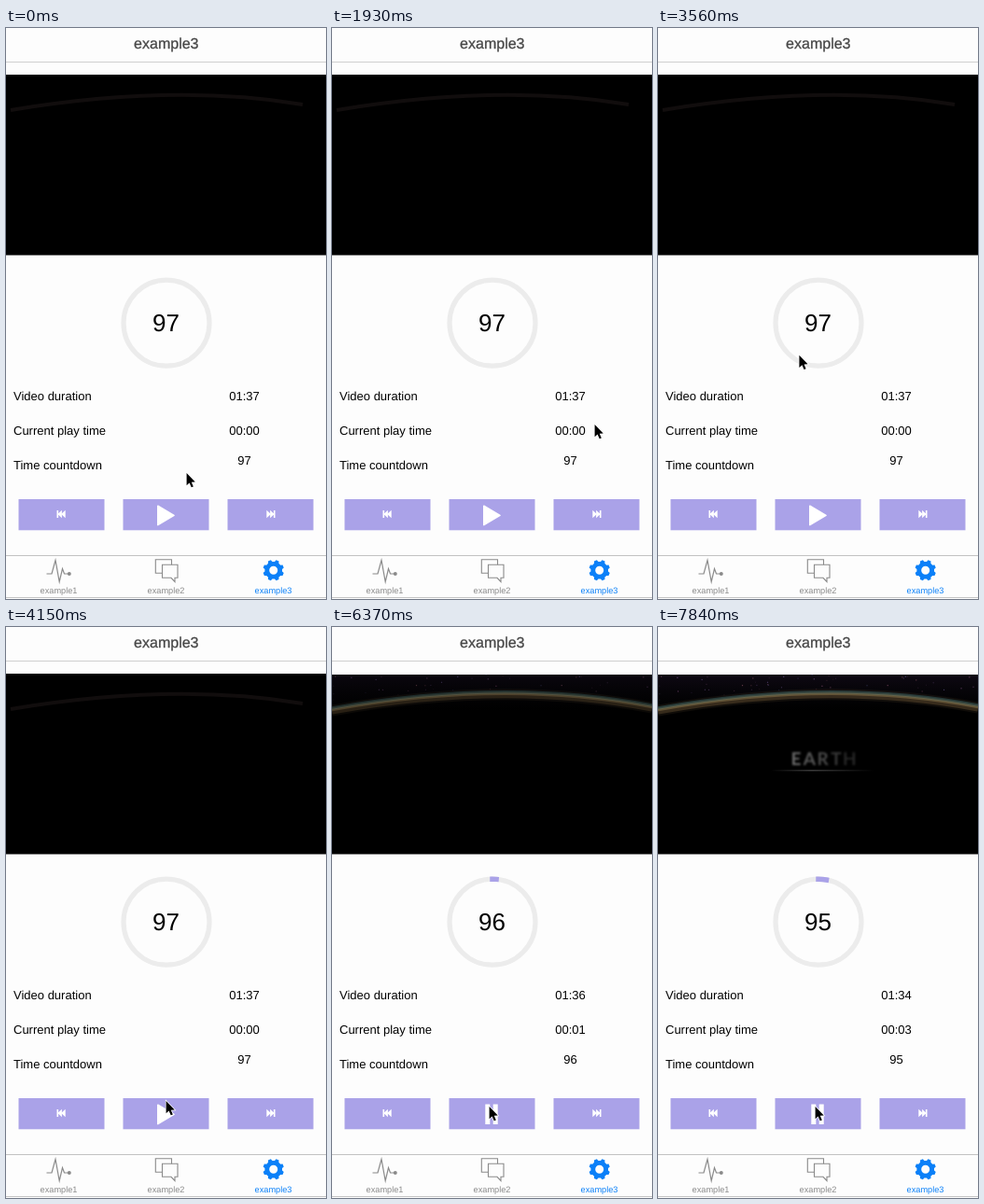
These frames come from a looping animation (343 by 612 pixels, 7990 ms). An HTML page with a canvas:

```html
<!DOCTYPE html>
<html lang="en">
<head>
<meta charset="utf-8">
<title>Video player</title>
<style>
  html, body { margin: 0; width: 100%; height: 100%; overflow: hidden; background: #fdfdfd; }
  canvas { display: block; width: 343px; height: 612px; }
</style>
</head>
<body>
<canvas id="stage"></canvas>
<script>
const W = 343, H = 612, LOOP = 7990;
const START = 1340, STEP = 147.8, LAST_STEP = 44, PLAY_STEP = 23;
const DURATION = 97, TAU = Math.PI * 2;
const LILAC = '#aaa2e8', GRAY = '#8a8a8a', BLUE = '#0b80f8', PAPER = '#fdfdfd';
const FONT = '"Liberation Sans", Arial, sans-serif';

const canvas = document.getElementById('stage');
const ctx = canvas.getContext('2d');
const dpr = window.devicePixelRatio || 1;
canvas.width = W * dpr;
canvas.height = H * dpr;
ctx.textRendering = 'geometricPrecision';

// Stops of the pointer tip: [step, x, y]
const stops = [
  [-1, 193, 476], [4, 281, 424], [8, 201, 434], [11, 146, 301],
  [16, 152, 362], [19, 171, 507], [21, 168, 513]
];

const clamp = (v, lo = 0, hi = 1) => Math.min(hi, Math.max(lo, v));
const mix = (a, b, f) => a + (b - a) * f;

function pointerAt(step) {
  const i = stops.findIndex(s => step < s[0]);
  if (i < 0) return stops[stops.length - 1].slice(1);
  const [k0, x0, y0] = stops[i - 1], [k1, x1, y1] = stops[i];
  const f = (step - k0) / (k1 - k0);
  return [mix(x0, x1, f), mix(y0, y1, f)];
}

function randomizer(seed) {
  return () => (seed = (seed * 16807) % 2147483647) / 2147483647;
}

function rect(x, y, w, h, color) {
  ctx.fillStyle = color;
  ctx.fillRect(x, y, w, h);
}

function text(str, x, y, size, color = '#000', align = 'center') {
  ctx.font = `${size}px ${FONT}`;
  ctx.textAlign = align;
  ctx.fillStyle = color;
  ctx.fillText(str, x, y);
}

function stroke(color, width) {
  ctx.strokeStyle = color;
  ctx.lineWidth = width;
  ctx.stroke();
}

function fill(color, rule = 'nonzero') {
  ctx.fillStyle = color;
  ctx.fill(rule);
}

function trace(points, closed = true) {
  ctx.beginPath();
  points.forEach(([x, y]) => ctx.lineTo(x, y));
  if (closed) ctx.closePath();
}

function arc(cx, cy, r, from = 0, to = TAU) {
  ctx.beginPath();
  ctx.arc(cx, cy, r, from, to);
}

function horizon(dy, width, color) {
  ctx.beginPath();
  ctx.moveTo(0, 88.5 + dy);
  ctx.quadraticCurveTo(184, 55.5 + dy, W, 85.5 + dy);
  stroke(color, width);
}

function drawStars(level) {
  const rand = randomizer(421);
  for (let i = 0; i < level * 60; i++) {
    const x = rand() * W;
    const edge = 71 + 16 * ((x - 188) / 188) ** 2;
    const y = 51 + rand() * (edge - 56);
    rect(x, y, 1.2, 1.2, `hsla(${230 + rand() * 130},40%,62%,${mix(0.1, 0.55, rand()) * level})`);
  }
}

function drawTitle(show) {
  ctx.save();
  ctx.font = '700 19px Lato, sans-serif';
  ctx.textAlign = 'center';
  ctx.filter = `blur(${0.8 * dpr}px)`;
  [...'EARTH'].forEach((letter, i) => {
    ctx.fillStyle = `rgba(150,150,150,${show * (0.7 - i * 0.11)})`;
    ctx.fillText(letter, 148 + i * 14.3, 147.5);
  });
  ctx.restore();
  const line = ctx.createLinearGradient(121, 0, 231, 0);
  line.addColorStop(0, 'rgba(130,130,130,0)');
  line.addColorStop(0.4, `rgba(130,130,130,${show * 0.45})`);
  line.addColorStop(1, 'rgba(130,130,130,0)');
  rect(121, 153, 110, 1.5, line);
}

function drawVideo(playing, t) {
  const top = playing ? 51 : 50;
  ctx.save();
  ctx.beginPath();
  ctx.rect(0, top, W, 243.5 - top);
  ctx.clip();
  rect(0, top, W, 194, '#000');
  if (playing) {
    const level = 0.42 + 0.16 * t;
    const sky = ctx.createLinearGradient(0, top, 0, 90);
    sky.addColorStop(0, `rgba(16,10,22,${level})`);
    sky.addColorStop(1, 'rgba(8,8,12,0)');
    rect(0, top, W, 40, sky);
    drawStars(level);
    horizon(1, 12, `rgba(70,55,38,${level * 0.25})`);
    horizon(1.5, 7, `rgba(105,82,50,${level * 0.5})`);
    horizon(-1.5, 3.5, `rgba(60,105,105,${level * 0.55})`);
    horizon(0.5, 2.5, `rgba(150,130,85,${level * 0.5})`);
    drawTitle(clamp((t - 1.9) / 0.94));
  } else {
    ctx.beginPath();
    ctx.moveTo(5, 88);
    ctx.quadraticCurveTo(180, 59, 318, 82);
    stroke('#110d0d', 4);
  }
  ctx.restore();
}

function drawRing(t, playing, left) {
  const from = -TAU / 4;
  arc(172, 316.2, 46);
  stroke('#ececec', 5.2);
  if (playing) {
    ctx.lineCap = 'square';
    arc(172, 316.2, 46, from, from + Math.max(t, 0.1) / DURATION * TAU);
    stroke(LILAC, 5.5);
    ctx.lineCap = 'butt';
  }
  text(left, 171.5, 325, 26);
}

// Two arrowheads and a bar; dir is -1 for previous, 1 for next
function drawSkip(cx, dir) {
  const cy = 521;
  for (const x of [-4.2, -0.4]) {
    trace([[cx + dir * x, cy - 4.3], [cx + dir * (x + 4.6), cy], [cx + dir * x, cy + 4.3]]);
    fill('#fff');
  }
  rect(cx + dir * 4.2 - 0.8, cy - 4, 1.6, 8, '#fff');
}

function drawButtons(playing) {
  for (let i = 0; i < 3; i++) rect(13.5 + i * 112, 505, 92, 33.3, LILAC);
  drawSkip(59.5, -1);
  drawSkip(283.5, 1);
  if (playing) {
    for (const x of [164.3, 172.7]) rect(x, 511.5, 5, 21.5, '#fff');
  } else {
    ctx.lineJoin = 'round';
    trace([[162.8, 512.2], [180, 522.4], [162.8, 532.6]]);
    fill('#fff');
    stroke('#fff', 1.6);
    ctx.lineJoin = 'miter';
  }
}

function drawPulse() {
  trace([[43.5, 585], [49, 585], [53, 570.5], [57.2, 593.5], [60.5, 579.5], [62.5, 585], [67, 585]], false);
  stroke(GRAY, 1.2);
  arc(67.8, 585, 2);
  fill(GRAY);
}

function drawChat() {
  ctx.beginPath();
  ctx.rect(160.3, 569.7, 17.2, 14.5);
  stroke(GRAY, 1.1);
  trace([[167.5, 575.3], [184, 575.3], [184, 589.3], [181, 589.3], [181, 593.5], [177, 589.3], [167.5, 589.3]]);
  fill(PAPER);
  stroke(GRAY, 1.1);
}

function drawGear(cx, cy) {
  const points = [];
  for (let i = 0; i < 8; i++) {
    for (const [turn, r] of [[-0.25, 11.4], [-0.14, 9.4], [0.14, 9.4], [0.25, 11.4]]) {
      const a = i * TAU / 8 + turn;
      points.push([cx + r * Math.cos(a), cy + r * Math.sin(a)]);
    }
  }
  trace(points);
  ctx.moveTo(cx + 4.5, cy);
  ctx.arc(cx, cy, 4.5, 0, TAU);
  fill(BLUE, 'evenodd');
}

function drawTabs() {
  rect(0, 565, W, 1, '#c2c2c2');
  rect(0, 610, W, 1, '#c4c4c4');
  drawPulse();
  drawChat();
  drawGear(286.7, 581.3);
  for (let i = 0; i < 3; i++) {
    text(`example${i + 1}`, 56.5 + i * 115, 606, 9.2, i === 2 ? BLUE : GRAY);
  }
}

function drawPointer(x, y) {
  ctx.save();
  ctx.translate(x + 0.6, y + 1);
  ctx.scale(0.88, 0.88);
  trace([[0, 0], [0, 15], [3.4, 11.8], [5.8, 17.4], [8.2, 16.4], [5.9, 11], [10.4, 10.8]]);
  stroke('#fff', 1.6);
  fill('#000');
  ctx.restore();
}

const clock = s => [Math.floor(s / 60), s % 60].map(n => String(n).padStart(2, '0')).join(':');

function draw(ms) {
  const step = clamp(Math.floor((ms - START + 12) / STEP), -1, LAST_STEP);
  const playing = step >= PLAY_STEP;
  const t = playing ? Math.max(0, (START + step * STEP - 5000) / 1000) : 0;
  const played = Math.round(t);
  const left = String(Math.ceil(DURATION - t));

  ctx.setTransform(dpr, 0, 0, dpr, 0, 0);
  rect(0, 0, W, H, PAPER);
  rect(0, 36, W, 1, '#cfcfcf');
  text('example3', 171.8, 22, 16, '#474747');
  ctx.strokeStyle = '#474747';
  ctx.lineWidth = 0.3;
  ctx.strokeText('example3', 171.8, 22);

  drawVideo(playing, t);
  drawRing(t, playing, left);

  ['Video duration', 'Current play time', 'Time countdown'].forEach((label, i) => {
    text(label, 8, 399 + i * 37, 13, '#000', 'left');
  });
  text(clock(DURATION - played), 255.5, 399, 13);
  text(clock(played), 255.5, 436, 13);
  text(left, 255.5, 468, 13);

  drawButtons(playing);
  drawTabs();
  drawPointer(...pointerAt(step));
}

const begin = performance.now();
function tick() {
  draw((performance.now() - begin) % LOOP);
  requestAnimationFrame(tick);
}
tick();
</script>
</body>
</html>
```
